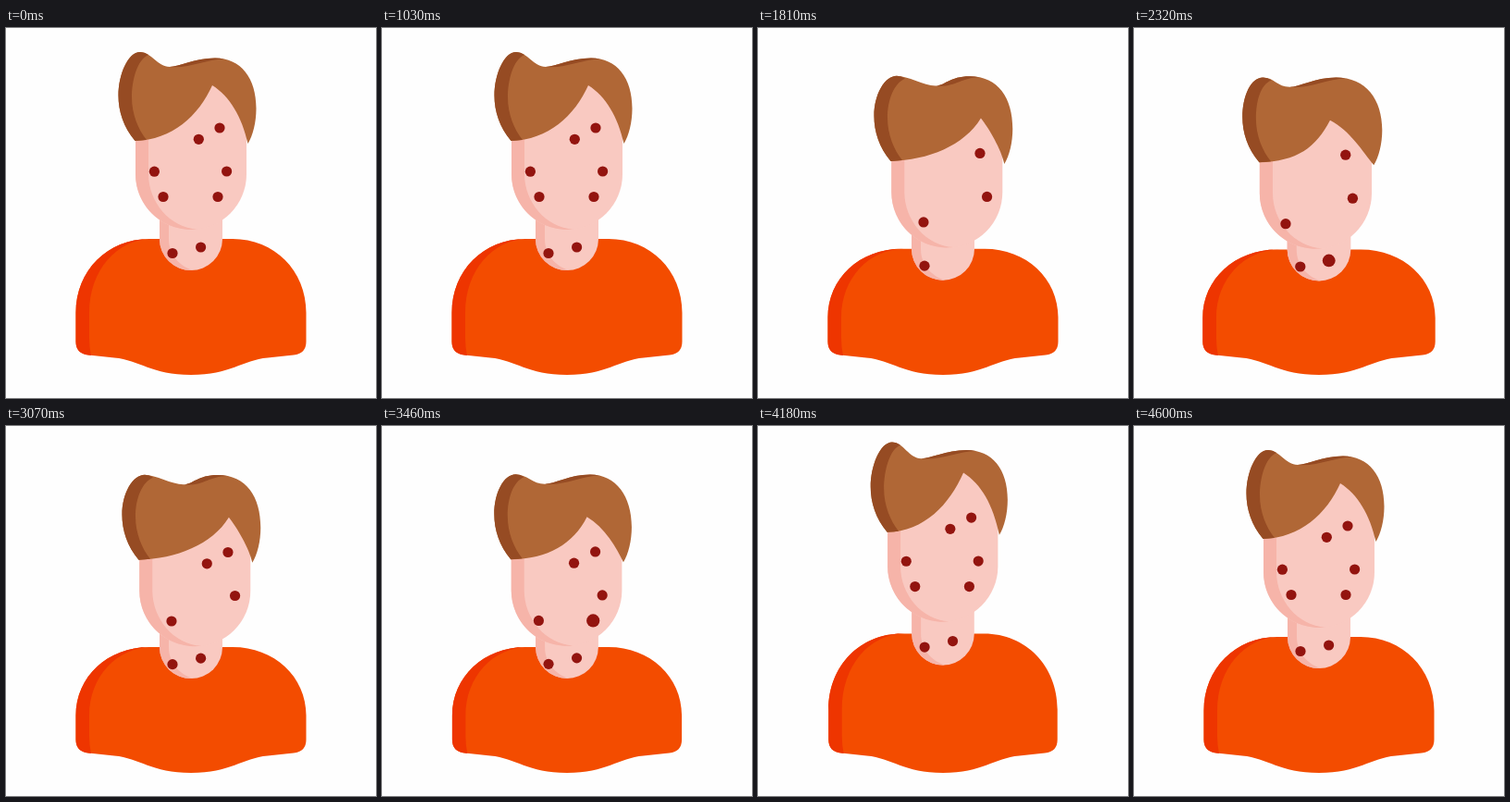
These frames come from a looping animation (400 px wide and 400 px high, 4630 ms). An HTML page:

```html
<!DOCTYPE html>
<html lang="en">
<head>
<meta charset="utf-8">
<title>Spots</title>
<style>
html, body { margin: 0; height: 100%; overflow: hidden; background: #fefefe; }
svg { display: block; width: 100vw; height: 100vh; }
.shirt { fill: #f34c00; }
.shirt-shade { fill: #ee3500; }
.skin { fill: #f9c9c1; }
.skin-shade { fill: #f6b4a9; }
.hair { fill: #b06736; }
.hair-shade { fill: #964b23; }
.spot { fill: #93140f; }
</style>
</head>
<body>
<svg viewBox="0 0 400 400"><g id="person"></g></svg>
<script>
const LOOP = 4630;
const person = document.getElementById('person');

function add(tag, cls) {
  const el = document.createElementNS('http://www.w3.org/2000/svg', tag);
  el.setAttribute('class', cls);
  person.appendChild(el);
  return el;
}

const [shirt, shirtShade, neck, neckShade, face, faceShade, hair, hairSide, hairStreak] =
  ['shirt', 'shirt-shade', 'skin', 'skin-shade', 'skin', 'skin-shade', 'hair', 'hair-shade', 'hair-shade']
    .map(cls => add('path', cls));

// Keys are [time, value] pairs joined by sine easing.
const nodKeys = [[1030, 0], [1310, -.37], [1860, 1], [2320, 1.035], [3090, 1.01], [3700, .98], [4250, -.37], [4590, 0]];
const turnKeys = [[1310, 0], [1830, 1], [2460, -1], [3090, 1], [3790, -1], [4250, 0]];
const widthKeys = [[1030, 0], [1310, -.8], [1800, 0], [2320, 1.2], [3070, 0], [3850, -.8], [4250, -.8], [4590, 0]];

function track(keys, t) {
  if (t <= keys[0][0]) return keys[0][1];
  for (let i = 1; i < keys.length; i++) {
    const [t0, a] = keys[i - 1], [t1, b] = keys[i];
    if (t < t1) return a + (b - a) * (1 - Math.cos(Math.PI * (t - t0) / (t1 - t0))) / 2;
  }
  return keys[keys.length - 1][1];
}

// Travel of each head part: down on a nod, right and left on a turn.
const travel = {
  face: [20, 4.3, 4.6],
  left: [22.5, 4, 4.5],
  top: [26.5, 5, 6.5],
  dip: [21, 15, 11],
  crown: [20.2, 3, 10],
  corner: [20.2, 6, 4.5],
  right: [22.5, 4.8, 3.7],
  fringe: [36, 8, 11],
  tip: [36.5, 18, 14.5],
  swoop: [33, 15, 14.5],
  spot: [28.2, 9, 7.4],
  rightSpot: [28.2, 9, 3.3],
  neckSpot: [14, 0, 0]
};

// x, y, part, and the time of popping up for spots that vanish
const spots = [
  [231, 108, 'rightSpot'], [238.6, 155, 'rightSpot'], [170, 182.5, 'spot'], [180, 243.5, 'neckSpot'],
  [210.6, 237, 'neckSpot', 2090], [208.3, 120.3, 'spot', 2660],
  [229, 182.5, 'spot', 3240], [160.4, 155.2, 'spot', 3690]
].map(([x, y, part, pop]) => ({ x, y, part, pop, el: add('circle', 'spot') }));

function spotScale(pop, t) {
  if (!pop) return 1;
  return track([[1030, 1], [1300, 0], [pop, 0], [pop + 160, 1.42], [pop + 310, 1]], t);
}

function draw(now) {
  const t = now % LOOP;
  const nod = track(nodKeys, t), turn = track(turnKeys, t);
  const set = (el, d) => el.setAttribute('d', d);

  function pos(part, x, y) {
    const [down, right, left] = travel[part];
    return [x + turn * (turn > 0 ? right : left), y + nod * down];
  }
  const pt = (part, x, y) => pos(part, x, y).map(n => n.toFixed(2)).join(' ') + ' ';

  person.setAttribute('transform', `translate(200) scale(${1 + .008 * track(widthKeys, t)} 1) translate(-200)`);

  const top = 228 + 11 * nod, side = 308 + 5 * nod, mid = 262 + 9 * nod;
  set(shirt, `M155 ${top}H245C290 ${top} 324.5 ${mid} 324.5 ${side}V339Q324.5 352 311 353.5L283 356.5
    C255 359 243 375 200 375S145 359 117 356.5L89 353.5Q75.5 352 75.5 339V${side}C75.5 ${mid} 110 ${top} 155 ${top}Z`);
  set(shirtShade, `M158 ${top}H155C110 ${top} 75.5 ${mid} 75.5 ${side}V339Q75.5 352 89 353.5L92 354
    Q90 345 90 335V${side}C90 ${mid} 120 ${top} 158 ${top}Z`);

  set(neck, `M166 ${top - 26}V${top}A34 34 0 0 0 234 ${top}V${top - 26}Z`);
  set(neckShade, `M166 ${top - 26}V${top}A34 34 0 0 0 202 ${top + 33.9}
    C187 ${top + 29} 176 ${top + 17} 176 ${top}V${top - 26}Z`);

  const f = (x, y) => pt('face', x, y);
  set(face, `M${f(140, 54)}L${f(140, 158)}A60 60 0 0 0 ${f(260, 158)}L${f(260, 54)}Z`);
  set(faceShade, `M${f(140, 80)}L${f(140, 158)}A60 60 0 0 0 ${f(207, 217.6)}
    C${f(177, 216)}${f(154, 188)}${f(154, 158)}L${f(154, 80)}Z`);

  const edge = `M${pt('left', 139.5, 122)}C${pt('left', 127, 107)}${pt('left', 121.5, 90)}${pt('left', 121.5, 73)}
    C${pt('left', 121.5, 50)}${pt('top', 132, 26)}${pt('top', 145, 26)}`;
  const ridge = `C${pt('dip', 187, 42)}${pt('crown', 204, 32.5)}${pt('crown', 226, 32.5)}`;
  set(hair, `${edge}C${pt('top', 157, 26)}${pt('dip', 164, 42)}${pt('dip', 177, 42)}${ridge}
    C${pt('corner', 254, 32.5)}${pt('right', 270.5, 54)}${pt('right', 270.5, 87)}
    C${pt('right', 270.5, 102)}${pt('right', 267, 116)}${pt('right', 261.5, 125)}
    C${pt('fringe', 255, 96)}${pt('fringe', 242, 74)}${pt('tip', 223, 62)}
    C${pt('swoop', 208, 95)}${pt('left', 180, 121)}${pt('left', 139.5, 122)}Z`);
  set(hairSide, `${edge}Q${pt('top', 150, 26)}${pt('top', 154, 29)}
    C${pt('top', 142, 34)}${pt('left', 136, 56)}${pt('left', 136, 75)}
    C${pt('left', 136, 93)}${pt('left', 143, 110)}${pt('left', 152, 121)}Z`);
  set(hairStreak, `M${pt('dip', 177, 42)}${ridge}Q${pt('crown', 231, 32.5)}${pt('crown', 236, 33.5)}
    C${pt('crown', 216, 34)}${pt('dip', 198, 44)}${pt('dip', 177, 42)}Z`);

  for (const s of spots) {
    const [x, y] = pos(s.part, s.x, s.y);
    s.el.setAttribute('cx', x);
    s.el.setAttribute('cy', y);
    s.el.setAttribute('r', 5.6 * spotScale(s.pop, t));
  }
}

function tick() {
  draw(performance.now());
  requestAnimationFrame(tick);
}
tick();
</script>
</body>
</html>
```
